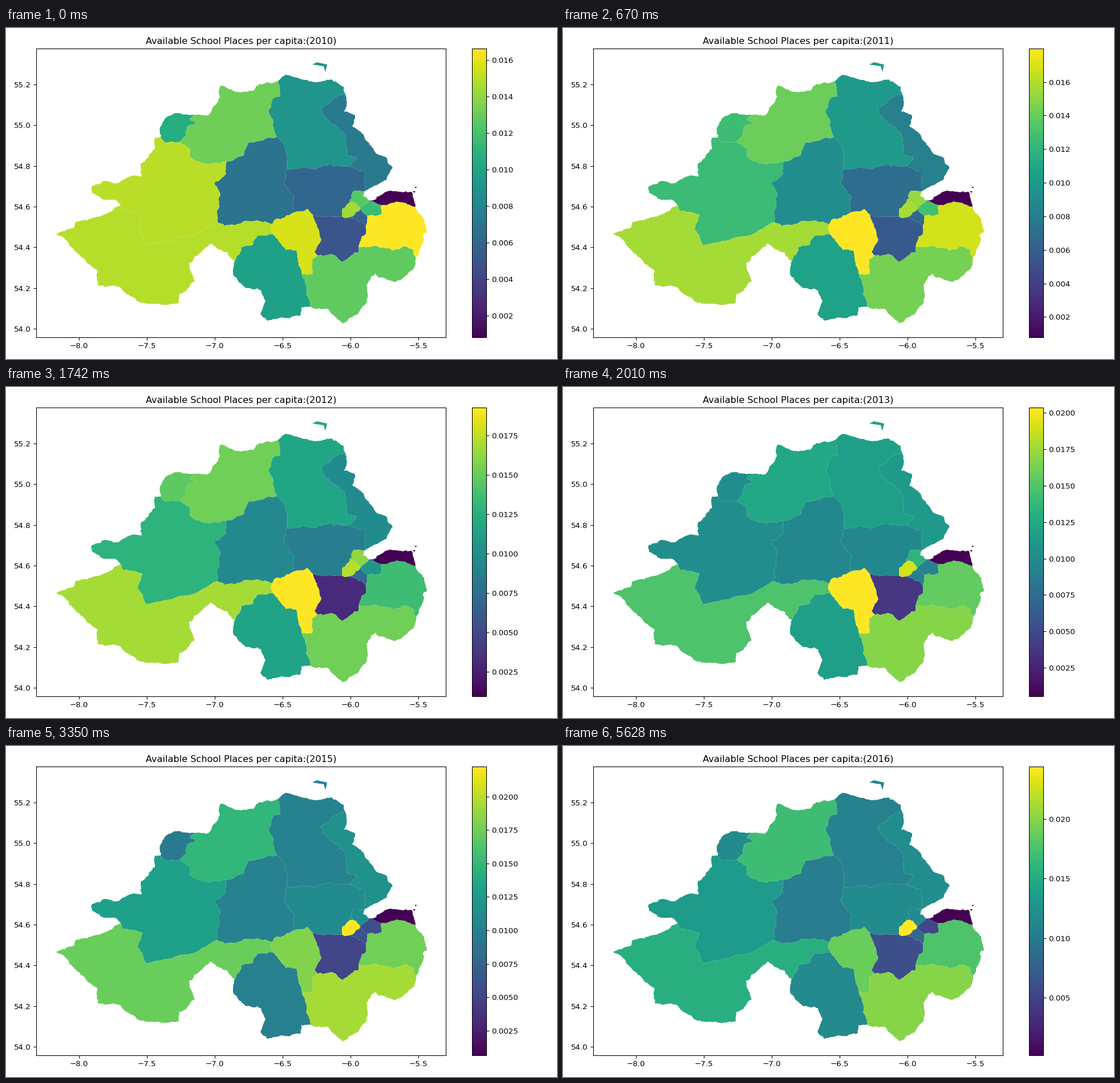
A matplotlib script for the animation above (6.7 s loop, 966x580 px).

```python
import matplotlib.pyplot as plt
import numpy as np
from matplotlib.animation import FuncAnimation
from matplotlib.collections import PolyCollection

W, H, DPI = 966, 580, 96
FRAMES, INTERVAL = 10, 670
FIRST_YEAR = 2010

# Ends of the colour scale, year by year
LOWS = (0.00083, 0.00079, 0.00094, 0.00054, 0.00076, 0.00067, 0.00019)
HIGHS = (0.01661, 0.01799, 0.01928, 0.02037, 0.02147, 0.02224, 0.02440)

# Position of each area on the colour scale, year by year
LEVELS = {
    "FO": (.62, .69, .75, .49, .60, .41, .475),
    "EL": (.78, .775, .785, .60, .70, .66, .69),
    "NA": (.52, .54, .59, .56, .45, .445, .44),
    "EA": (.41, .43, .48, .54, .55, .50, .49),
    "WT": (.895, .68, .645, .49, .49, .565, .545),
    "MU": (.38, .49, .47, .465, .445, .445, .42),
    "SA": (.33, .355, .42, .465, .46, .48, .48),
    "FE": (.89, .865, .865, .72, .745, .77, .63),
    "NE": (.57, .575, .58, .56, .57, .43, .475),
    "UB": (.94, 1, 1, 1, 1, .81, .77),
    "LV": (.26, .28, .12, .16, .17, .21, .24),
    "SD": (.755, .79, .785, .82, .85, .865, .82),
    "ST": (1, .93, .69, .76, .77, .785, .72),
    "ND": (0,) * 7,
    "BN": (.74, .84, .83, .65, .70, .49, .48),
    "BW": (.86, .87, .89, .93, .965, 1, 1),
    "BE": (.68, .70, .53, .44, .43, .24, .21),
    "BS": (.31, .33, .35, .43, .46, .26, .34),
}

# Points where borders meet, in stage pixels
NODES = {
    "A": (329, 152), "B": (305, 199), "C": (271, 192), "D": (387, 234),
    "E": (475, 191), "F": (478, 92), "G": (597, 122), "H": (601, 242),
    "I": (492, 248), "J": (629, 286), "K": (503, 324), "L": (538, 327),
    "M": (467, 344), "N": (371, 340), "O": (201, 310), "P": (401, 409),
    "Q": (469, 362), "R": (519, 432), "S": (534, 488), "T": (547, 399),
    "U": (618, 384), "V": (718, 411), "W": (631, 347), "X": (590, 331),
    "Y": (602, 305), "Z": (637, 302), "a": (602, 332), "b": (621, 317),
    "c": (633, 329), "d": (657, 310), "e": (718, 313),
}

# Coasts (one area) and borders (two areas): end nodes and key points between
LINES = {
    "FO": ("CA", [(270, 174), (282, 156), (303, 149)]),
    "EL": ("AF", [(354, 153), (375, 121), (376, 101), (400, 111), (432, 110),
                  (444, 98)]),
    "NA": ("FG", [(490, 82), (541, 95), (569, 90), (592, 103)]),
    "EA": ("GJ", [(593, 147), (612, 153), (607, 172), (628, 190), (649, 220),
                  (668, 228), (678, 245), (667, 266)]),
    "WT": ("CO", [(261, 192), (261, 212), (236, 243), (238, 260), (215, 261),
                  (197, 272), (173, 268), (150, 278), (151, 289), (166, 299),
                  (191, 301)]),
    "FE": ("OP", [(165, 330), (122, 340), (119, 350), (88, 361), (118, 387),
                  (160, 424), (161, 451), (200, 454), (236, 482), (303, 482),
                  (304, 466), (331, 444), (321, 412), (358, 378), (389, 394)]),
    "NE": ("PS", [(398, 431), (421, 456), (446, 459), (455, 478), (447, 503),
                  (458, 513), (517, 503), (518, 489)]),
    "SD": ("SV", [(564, 492), (590, 518), (619, 498), (633, 481), (632, 450),
                  (648, 430), (654, 438), (683, 445), (711, 425)]),
    "ST": ("eV", [(733, 334), (738, 357), (724, 390)]),
    "ND": ("Ze", [(666, 287), (711, 287)]),
    "BN": ("JZ", [(626, 295)]),
    "FO EL": ("AB", [(322, 160), (332, 168), (318, 172), (316, 188)]),
    "FO WT": ("BC", [(281, 201)]),
    "EL WT": ("DB", [(352, 238), (323, 227), (322, 211)]),
    "EL MU": ("ED", [(425, 201), (417, 223)]),
    "EL NA": ("FE", [(481, 119), (468, 124), (461, 143)]),
    "NA MU": ("IE", [(490, 214)]),
    "NA EA": ("GH", [(590, 115), (551, 141), (568, 166), (595, 187),
                     (597, 222), (615, 227)]),
    "NA SA": ("HI", [(567, 239), (545, 246), (520, 244)]),
    "EA SA": ("HJ", [(629, 251)]),
    "WT FE": ("ON", [(207, 321), (239, 326), (230, 353), (246, 381),
                     (318, 365)]),
    "WT MU": ("ND", [(376, 293), (366, 270), (386, 256)]),
    "MU FE": ("NM", [(384, 347), (435, 338)]),
    "MU UB": ("MK", [(470, 337)]),
    "UB SA": ("KL", [(528, 317)]),
    "MU SA": ("KI", [(506, 296), (487, 272)]),
    "FE NE": ("PQ", [(413, 384), (432, 381), (441, 364)]),
    "FE UB": ("QM", []),
    "NE UB": ("QR", [(491, 389), (509, 390)]),
    "UB SD": ("RT", [(537, 432), (537, 406)]),
    "UB LV": ("TL", [(541, 392), (553, 371)]),
    "NE SD": ("RS", [(526, 466)]),
    "SD ST": ("VU", [(713, 388), (695, 383), (677, 390), (656, 385)]),
    "LV SD": ("UT", [(617, 394), (590, 410), (573, 397)]),
    "LV ST": ("UW", [(623, 369), (631, 361)]),
    "SA BN": ("JY", [(610, 285)]),
    "SA BW": ("YX", [(590, 316)]),
    "SA LV": ("XL", []),
    "LV BW": ("Xa", []),
    "LV BS": ("Wa", [(612, 335)]),
    "BW BS": ("ab", [(612, 326)]),
    "BW BN": ("Yb", [(613, 306)]),
    "BN BE": ("bZ", []),
    "BS BE": ("bc", []),
    "BE ST": ("cd", [(658, 326)]),
    "BE ND": ("dZ", []),
    "ND ST": ("ed", [(697, 306)]),
    "BS ST": ("cW", []),
}

ISLETS = [
    ("NA", [(537, 64), (545, 60), (563, 64), (560, 77), (557, 67)]),
    ("ND", [(716, 279), (720, 278), (719, 281)]),
    ("ND", [(713, 286), (718, 286), (716, 289)]),
]

rng = np.random.default_rng(4)


def roughen(a, b):
    """Points from a up to b, shaken by repeated midpoint displacement."""
    length = np.hypot(*(b - a))
    if length < 5:
        return [a]
    middle = (a + b) / 2 + rng.normal(0, min(0.1 * length, 1.1), 2)
    return roughen(a, middle) + roughen(middle, b)


def trace(ends, between):
    points = np.array([NODES[ends[0]], *between, NODES[ends[1]]], float)
    rough = [p for a, b in zip(points, points[1:]) for p in roughen(a, b)]
    return rough + [points[-1]]


def outline(area):
    """Chain all lines of an area end to end into one ring."""
    parts = [part for key, part in traced.items() if area in key.split()]
    (_, tail), ring = parts.pop(0)
    while parts:
        i = next(i for i, (ends, _) in enumerate(parts) if tail in ends)
        (start, end), line = parts.pop(i)
        forward = start == tail
        ring = ring + (line if forward else line[::-1])
        tail = end if forward else start
    return ring


def to_degrees(points):
    x, y = np.array(points, float).T
    return np.column_stack([-8 + (x - 128) / 238, 55.2 - (y - 99) / 356.67])


def add_axes(left, top, right, bottom):
    return fig.add_axes([left / W, 1 - bottom / H, (right - left) / W, (bottom - top) / H])


traced = {key: (ends, trace(ends, between)) for key, (ends, between) in LINES.items()}
shapes = [(area, outline(area)) for area in LEVELS] + ISLETS
levels = np.array([LEVELS[area] for area, _ in shapes])

plt.rcParams["font.size"] = 10.06
fig = plt.figure(figsize=(W / DPI, H / DPI), dpi=DPI)
box = (53, 36, 771, 542)
ax = add_axes(*box)
cax = add_axes(817, 36, 842, 542)

(left, top), (right, bottom) = to_degrees([box[:2], box[2:]])
ax.set(xlim=(left, right), ylim=(bottom, top),
       xticks=np.arange(-8, -5.4, 0.5), yticks=np.arange(54, 55.3, 0.2))

regions = PolyCollection([to_degrees(p) for _, p in shapes], cmap="viridis",
                         edgecolors="none", linewidths=0)
regions.set_array(levels[:, 0])
regions.set_clim(LOWS[0], HIGHS[0])
ax.add_collection(regions, autolim=False)
fig.colorbar(regions, cax=cax)
title = ax.set_title("")


def update(frame):
    # The last year is held until the loop ends
    year = min(frame, len(LOWS) - 1)
    low, high = LOWS[year], HIGHS[year]
    regions.set_array(low + levels[:, year] * (high - low))
    regions.set_clim(low, high)
    title.set_text(f"Available School Places per capita:({FIRST_YEAR + year})")
    return regions, title


anim = FuncAnimation(fig, update, frames=FRAMES, interval=INTERVAL,
                     repeat=True, repeat_delay=0, blit=False)
plt.show()
```
